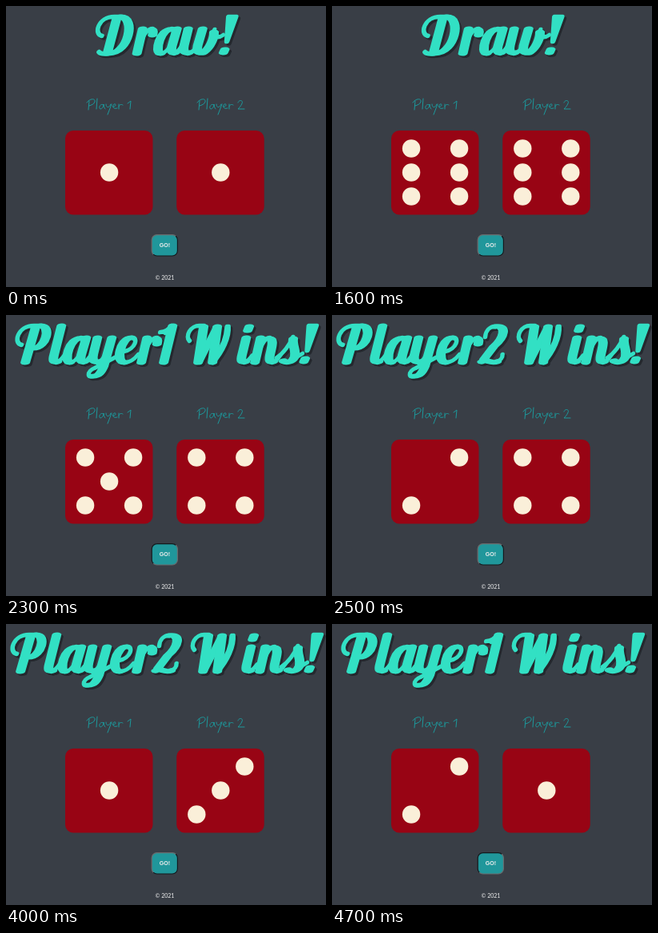
An HTML page with a canvas that plays this animation: 400 px wide and 352 px high, repeating every 4800 ms.

```html
<!DOCTYPE html>
<html lang="en">
<head>
<meta charset="utf-8">
<title>Dice game</title>
<style>
  html, body { margin: 0; width: 100%; height: 100%; overflow: hidden; background: #393e46; }
  canvas { display: block; }
</style>
</head>
<body>
<canvas id="stage" width="400" height="352" role="img" aria-label="Two players roll dice"></canvas>
<script>
const ctx = document.getElementById('stage').getContext('2d');
const LOOP = 4800;
const COLOR = {
  back: '#393e46', title: '#32e0c4', shadow: '#24282e', label: '#1c9a9d',
  die: '#980414', pip: '#faefd9', button: '#20979b', light: '#696b6d', dark: '#14181c'
};

// Each throw: start time and the two values.
const rolls = [
  [0, 1, 1], [800, 6, 6], [1700, 5, 4], [2500, 2, 4], [3300, 1, 3], [4100, 2, 1]
];
const presses = [[700, 800], [1500, 1600], [2300, 2500], [3100, 3200], [3900, 4000], [4700, 4800]];

// Script lettering: advance, strokes of a broad nib, strokes of a fine pen.
// Baseline at 0, slanted when drawn. The nib is twice as wide as it is tall.
const NIB = 6;
function glyph(advance, broadStrokes, fineStrokes) {
  const broad = new Path2D();
  broad.addPath(new Path2D(broadStrokes), new DOMMatrix().scale(0.5, 1));
  return { advance, broad, fine: new Path2D(fineStrokes) };
}
const swash = 'M4-25C-7-27-6-49 14-49L24-49';
const script = {
  D: glyph(46, 'M18-48L15-3M22-49C42-49 42-3 17-3', swash + 'M17-3C11-2 7-2 4-5'),
  P: glyph(40, 'M17-48L13-3M23-49C37-49 35-21 20-21', swash),
  W: glyph(61, 'M13-48L15-3M30-48L33-3', 'M-1-30C-8-36-4-50 8-49L13-49M18-3L31-46M17-14L27-46M34-3C43-16 48-34 44-48M35-12C41-22 44-34 42-48'),
  a: glyph(32, 'M18-33C3-36 1-3 10-3M24-34L22-12C22-4 25-3 28-4', 'M17-34C20-34 22-32 23-28M10-3C15-3 19-10 21-16M27-3C30-4 32-8 34-12'),
  e: glyph(28, 'M15-34C2-34 1-3 13-3', 'M15-34C25-35 23-19 10-17M13-3C19-3 24-6 28-13'),
  i: glyph(19, 'M8-34L7-11C7-4 9-3 13-4M9-48L8-43', 'M12-3C15-4 18-8 20-12'),
  l: glyph(19, 'M9-49L7-11C7-4 9-3 13-4', 'M12-3C15-4 18-8 20-12'),
  n: glyph(35, 'M7-34L6-3M17-33C25-34 23-20 23-12C23-4 26-3 29-4', 'M9-20C11-28 14-34 18-34M28-3C31-4 34-8 36-12'),
  r: glyph(26, 'M7-34L6-3M19-33C21-32 21-29 21-26', 'M9-20C10-28 14-34 19-34'),
  s: glyph(27, 'M13-33C13-24 21-17 19-9C17-3 10-2 6-5', 'M-3-9C4-14 10-25 12-35M19-8L28-14'),
  w: glyph(51, 'M6-34L5-13C5-4 9-3 13-4M24-34L22-13C22-4 26-3 30-4M39-30C41-22 38-10 31-4', 'M12-3C17-4 20-9 22-15M39-33C38-25 45-21 51-26'),
  y: glyph(33, 'M6-34L5-13C5-4 9-3 13-4M24-34L21 2C19 11 16 14 11 14', 'M12-3C16-4 19-9 21-15M12 14C3 17 1 8 10 4L34-10'),
  1: glyph(26, 'M10-49L8-3', 'M8-49C5-43 0-41-4-41M9-43L3-40'),
  2: glyph(38, 'M12-48C27-50 26-34 15-23L6-7M4-4C10-8 15-1 23-4', 'M2-35C1-43 5-49 13-48M22-4C27-5 29-9 28-13'),
  '!': glyph(24, 'M6-8L5-4', 'M2-49L12-49L7-18H6ZM7-46V-28'),
  ' ': glyph(10, '', '')
};

const playerWord = 'M3-10L2 1M0-8C3-13 11-14 10-9C9-6 6-5 3-4M13-13L12 0' +
  'M21-5C17-8 14-1 17 0C19 0 21-3 21-6C21-3 22-1 23 0' +
  'M24-6C24-1 28-1 30-6M31-6L26 7' +
  'M33-3C37-3 37-7 34-6C31-4 33 1 38-1M40-6L40 0M40-3C41-6 43-6 45-5';
const labels = [
  [101, new Path2D(playerWord + 'M51-7L55-10L54 0')],
  [239, new Path2D(playerWord + 'M51-8C52-12 58-11 56-7C55-4 52-1 51 0L59 0')]
];

function drawScript(text, x, y, color) {
  ctx.strokeStyle = color;
  for (const char of text) {
    const { advance, broad, fine } = script[char];
    ctx.save();
    ctx.transform(1, 0, -0.2, 1, x, y);
    ctx.lineWidth = 5.5;
    ctx.stroke(fine);
    ctx.scale(2, 1);
    ctx.lineWidth = NIB;
    ctx.stroke(broad);
    ctx.restore();
    x += advance;
  }
}

function drawTitle(text) {
  const width = [...text].reduce((sum, char) => sum + script[char].advance, 0);
  const x = 200.5 - width / 2;
  drawScript(text, x + 2.5, 65, COLOR.shadow);
  drawScript(text, x, 62.5, COLOR.title);
}

function drawLabel([x, path]) {
  ctx.save();
  ctx.translate(x, 129);
  ctx.strokeStyle = COLOR.label;
  ctx.lineWidth = 1;
  ctx.stroke(path);
  ctx.restore();
}

function roundRect(x, y, w, h, r) {
  ctx.beginPath();
  ctx.roundRect(x, y, w, h, r);
}

function drawDie(x, value) {
  ctx.fillStyle = COLOR.die;
  roundRect(x, 156, 109.5, 105.5, 10);
  ctx.fill();
  ctx.fillStyle = COLOR.pip;
  const pip = (col, row) => {
    ctx.beginPath();
    ctx.arc(x + 55.1 + col * 30, 208.5 + row * 30, 11.2, 0, Math.PI * 2);
    ctx.fill();
  };
  if (value % 2) pip(0, 0);
  if (value > 1) { pip(1, -1); pip(-1, 1); }
  if (value > 3) { pip(-1, -1); pip(1, 1); }
  if (value === 6) { pip(-1, 0); pip(1, 0); }
}

function drawButton(pressed) {
  const edge = ctx.createLinearGradient(185, 284, 211, 316);
  const [first, second] = pressed ? [COLOR.dark, COLOR.light] : [COLOR.light, COLOR.dark];
  edge.addColorStop(0.5, first);
  edge.addColorStop(0.5, second);
  roundRect(182.2, 286.6, 32.2, 26.4, 6.5);
  ctx.fillStyle = COLOR.button;
  ctx.fill();
  ctx.strokeStyle = edge;
  ctx.lineWidth = 1.2;
  ctx.stroke();
  drawText('GO!', 198.4, 302.3, 'bold 7px "Liberation Sans", Arial, sans-serif');
}

function drawText(text, x, y, font) {
  ctx.font = font;
  ctx.textAlign = 'center';
  ctx.fillStyle = '#eee';
  ctx.fillText(text, x, y);
}

function draw(time) {
  const [, one, two] = rolls.findLast(([start]) => time >= start);
  const pressed = presses.some(([from, to]) => time >= from && time < to);
  ctx.fillStyle = COLOR.back;
  ctx.fillRect(0, 0, 400, 352);
  ctx.lineCap = ctx.lineJoin = 'round';
  drawTitle(one === two ? 'Draw!' : `Player${one > two ? 1 : 2} Wins!`);
  labels.forEach(drawLabel);
  drawDie(74, one);
  drawDie(213.2, two);
  drawButton(pressed);
  drawText('© 2021', 198.5, 343, '7px Lato, sans-serif');
}

function tick() {
  draw(performance.now() % LOOP);
  requestAnimationFrame(tick);
}
tick();
</script>
</body>
</html>
```
